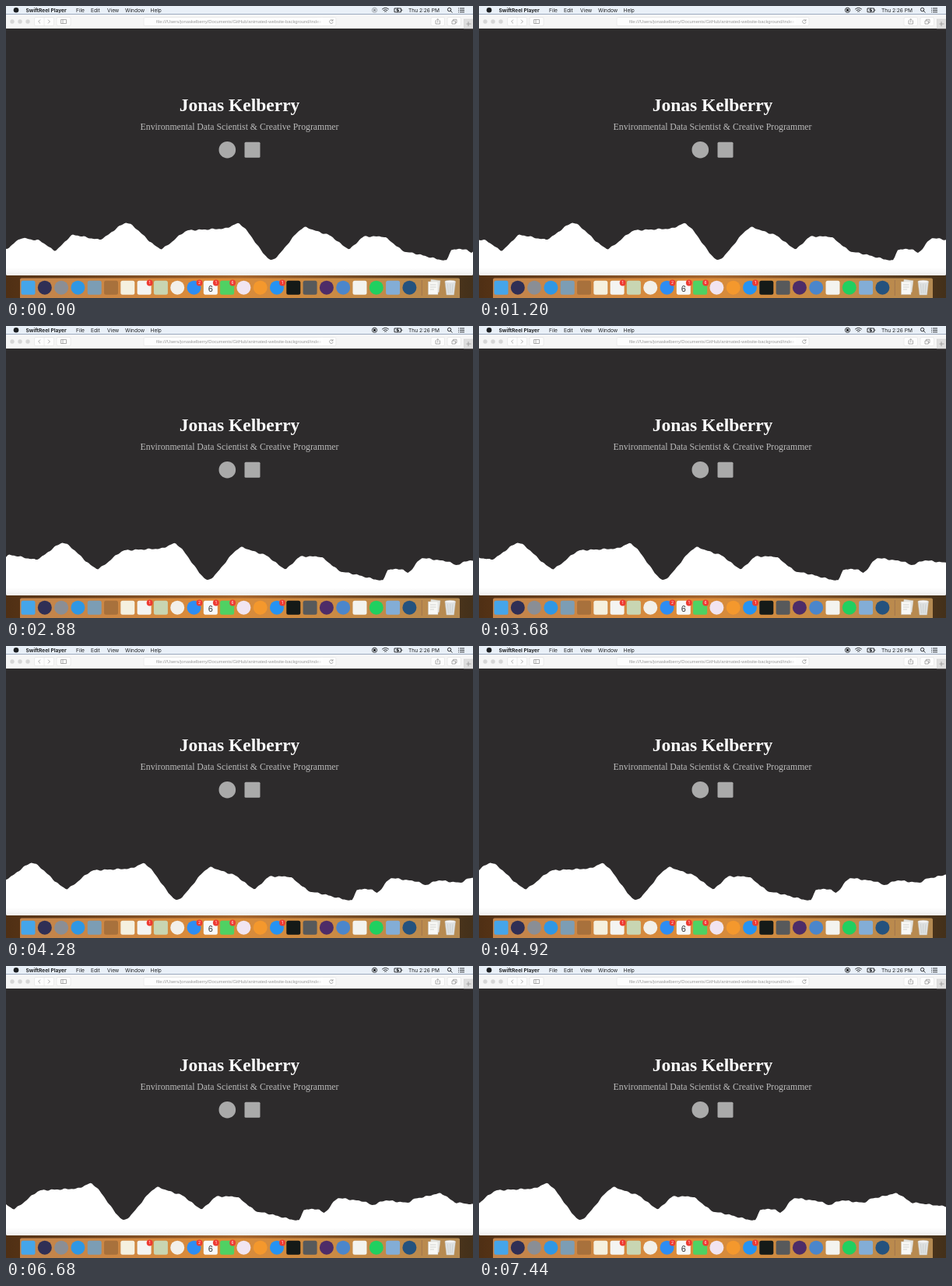
An HTML page for the animation above (7480 ms loop, 600 by 375 pixels).

```html
<!DOCTYPE html>
<html lang="en">
<head>
<meta charset="utf-8">
<title>Animated mountains</title>
<style>
  html, body { margin: 0; width: 100%; height: 100%; overflow: hidden; background: #2d2b2c; }
  svg { display: block; width: 100vw; height: 100vh; }
  .ui { font: 6.6px Inter, "Liberation Sans", sans-serif; fill: #1c1f22; }
  .serif { font-family: "Liberation Serif", serif; text-anchor: middle; }
  .button { fill: #fdfdfd; stroke: #dcdcdc; stroke-width: .5; }
  .line { fill: none; stroke: #8c8c8c; stroke-width: .7; }
  .dark { fill: none; stroke: #1c1f22; stroke-width: .9; }
</style>
</head>
<body>
<svg viewBox="0 0 600 375" preserveAspectRatio="none">
  <defs>
    <linearGradient id="wall">
      <stop offset="0" stop-color="#4f2f14"/>
      <stop offset=".5" stop-color="#a8662c"/>
      <stop offset="1" stop-color="#43301a"/>
    </linearGradient>
    <linearGradient id="shelf">
      <stop offset="0" stop-color="#c0844e"/>
      <stop offset=".45" stop-color="#dc8b38"/>
      <stop offset="1" stop-color="#b48a52"/>
    </linearGradient>
    <linearGradient id="fade">
      <stop offset="0" stop-color="#fff" stop-opacity="0"/>
      <stop offset="1" stop-color="#fff"/>
    </linearGradient>
    <linearGradient id="foot" x2="0" y2="1">
      <stop offset="0" stop-color="#eee" stop-opacity="0"/>
      <stop offset="1" stop-color="#eee"/>
    </linearGradient>
    <clipPath id="page"><path d="M0 29H600V344Q600 346 598 346H2Q0 346 0 344Z"/></clipPath>
  </defs>

  <!-- wallpaper -->
  <rect y="340" width="600" height="35" fill="url(#wall)"/>

  <!-- web page -->
  <g clip-path="url(#page)">
    <rect y="29" width="600" height="318" fill="#2d2b2c"/>
    <text class="serif" x="300" y="135" font-size="23.5" font-weight="700" fill="#fff">Jonas Kelberry</text>
    <text class="serif" x="300" y="158.6" font-size="11.75" fill="#bcbcbc">Environmental Data Scientist &amp; Creative Programmer</text>
    <circle cx="284.3" cy="184.7" r="10.8" fill="#aaa"/>
    <rect x="306.5" y="174.8" width="20" height="20" rx="1.5" fill="#aaa"/>
    <path id="ridge" fill="#fff"/>
    <rect y="336" width="600" height="10" fill="url(#foot)"/>
  </g>

  <!-- browser toolbar -->
  <rect y="11" width="600" height="18" fill="#f6f6f6"/>
  <rect y="28.5" width="600" height=".5" fill="#d2d2d2"/>
  <g fill="#d6d6d6">
    <circle cx="8" cy="20" r="2.7"/><circle cx="18" cy="20" r="2.7"/><circle cx="28" cy="20" r="2.7"/>
  </g>
  <g class="button">
    <rect x="36.5" y="14.5" width="25" height="11" rx="1.8"/>
    <rect x="65" y="14.5" width="18" height="11" rx="1.8"/>
    <rect x="177" y="14.5" width="247" height="11" rx="1.8"/>
    <rect x="546" y="14.5" width="17.5" height="11" rx="1.8"/>
    <rect x="567" y="14.5" width="17.5" height="11" rx="1.8"/>
  </g>
  <path d="M49 14.5V25.5" stroke="#dcdcdc" stroke-width=".5"/>
  <path class="line" d="M44 17.6L41.6 20L44 22.4M54 17.6L56.4 20L54 22.4M70.5 17.5H77.5V22.5H70.5ZM73 17.5V22.5"/>
  <path class="line" d="M553 18.8H552V23H557.5V18.8H556.5M554.75 21.3V16.6M553.3 18L554.75 16.5L556.2 18M573 19H577.3V23H573ZM574.5 19V17.3H579V21.5H577.3"/>
  <path class="line" d="M419.7 18.6A2.3 2.3 0 1 0 420.2 20.6M420 17V19H418"/>
  <rect x="588.5" y="17" width="12" height="12" fill="#dedede" stroke="#c6c6c6" stroke-width=".5"/>
  <path class="line" d="M591.5 23H597.5M594 20V26"/>
  <svg x="190" y="14.8" width="217" height="10.4">
    <text x="3" y="7.4" font-family="Liberation Sans, sans-serif" font-size="5.85" fill="#9b9b9b">file:///Users/jonaskelberry/Documents/GitHub/animated-website-background/index</text>
    <rect x="207" width="10" height="10.4" fill="url(#fade)"/>
  </svg>

  <!-- menu bar -->
  <rect width="600" height="11" fill="#e9f0f8"/>
  <rect y="10" width="600" height="1" fill="#9dabc0"/>
  <circle cx="13" cy="5.2" r="3.3" fill="#1c1f22"/>
  <g class="ui">
    <text x="25.5" y="7.7" font-weight="700">SwiftReel Player</text>
    <text x="90" y="7.7">File</text>
    <text x="109" y="7.7">Edit</text>
    <text x="130" y="7.7">View</text>
    <text x="153" y="7.7">Window</text>
    <text x="185.5" y="7.7">Help</text>
    <text x="517" y="7.7">Thu 2:26 PM</text>
  </g>
  <g id="record">
    <circle class="dark" cx="473.5" cy="5.3" r="3.1"/>
    <rect x="472" y="3.8" width="3" height="3" rx=".4" fill="#1c1f22"/>
  </g>
  <path class="dark" d="M483.2 4.2Q487.5 .6 491.8 4.2M484.7 5.8Q487.5 3.4 490.3 5.8M486.2 7.3Q487.5 6.2 488.8 7.3"/>
  <path class="dark" d="M499 3H507.5V7.8H499ZM508.8 4.6V6.2"/>
  <path d="M503.8 2L501 5.8H503L502.5 8.8L505.5 4.9H503.4Z" fill="#1c1f22"/>
  <path class="dark" d="M571.8 4.6A2.2 2.2 0 1 1 567.4 4.6A2.2 2.2 0 1 1 571.8 4.6M571.2 6.2L573.5 8.5M581 3H582M583 3H589M581 5.4H582M583 5.4H589M581 7.8H582M583 7.8H589"/>

  <!-- dock -->
  <path d="M18 375V351.5Q18 349.5 20 349.5H581Q583 349.5 583 351.5V375Z" fill="url(#shelf)"/>
  <g id="dock"></g>
  <path d="M534.3 352V372" stroke="#8d6b50" stroke-width=".6"/>
  <g stroke="#c8c8c8" stroke-width=".4">
    <rect x="545" y="352" width="12" height="15" fill="#e9e9e4" transform="rotate(7 551 360)"/>
    <rect x="542.5" y="354" width="12.5" height="16.5" fill="#f8f8f5"/>
    <path d="M545 358H552.5M545 361H552.5M545 364H550" stroke="#999"/>
    <path d="M564 354H577.5L575.5 371H566Z" fill="#dfe2e2"/>
    <ellipse cx="570.7" cy="354" rx="6.9" ry="1.7" fill="#f4f5f5"/>
    <path d="M567.5 357L568.5 369M570.7 357V369M574 357L573 369" stroke="#b3b8b8"/>
  </g>
</svg>
<script>
const LOOP = 7480, STEP = 40, SPEED = 0.02836;

// Peaks, saddles and valleys; everything between them is eased.
const summits = [
  [0, 312], [20, 298], [42, 301], [63, 314], [86, 294], [120, 300], [155, 278], [199, 312],
  [234, 288], [280, 286], [299, 279], [341, 327], [383, 284], [412, 293], [441, 312], [460, 296],
  [484, 296], [514, 316], [566, 327], [572, 313], [589, 312], [598, 317], [616, 298], [648, 302],
  [660, 307], [677, 301], [704, 304], [718, 298], [748, 292], [768, 304], [815, 309]
];

const ease = u => (u + u * u * (3 - 2 * u)) / 2;
const ripple = x => 0.5 * Math.sin(x * 0.42) + 0.4 * Math.sin(x * 0.73);

function heightAt(x) {
  const i = Math.max(1, summits.findIndex(([sx]) => sx >= x));
  const [x0, y0] = summits[i - 1], [x1, y1] = summits[i];
  return y0 + (y1 - y0) * ease((x - x0) / (x1 - x0)) + ripple(x);
}

function ridgePath(width) {
  let d = "M0 350";
  for (let x = 0; x <= width; x += 2) d += `L${x} ${heightAt(x).toFixed(2)}`;
  return d + "V350Z";
}

// Dock apps from left to right.
const square = (color, badge) => ({ color, badge, round: 2.5 });
const circle = (color, badge) => ({ color, badge, round: 9 });
const apps = [
  square("#45a5ea"), circle("#302f55"), circle("#8a8e95"), circle("#2f97e4"),
  square("#7c9db4"), square("#a8713c"), square("#f5f0df"), square("#f4f4f2", 1),
  square("#c8d5b2"), circle("#f2efe9"), circle("#2d8df3", 2), square("#f8f8f8", 1),
  square("#4fd163", 6), circle("#f1e4f0"), circle("#f4982d"), circle("#2593f2", 1),
  square("#151a18"), square("#57595b"), circle("#4d2c68"), circle("#4b86cb"),
  square("#f3f3ef"), circle("#20d060"), square("#83add6"), circle("#24527e")
];
const CALENDAR = 11;

const label = (x, y, size, fill, text) =>
  `<text x="${x}" y="${y}" font-family="Inter, sans-serif" font-size="${size}" fill="${fill}" text-anchor="middle">${text}</text>`;

function appIcon({ color, badge, round }, i) {
  const x = 28.5 + i * 21.3;
  let icon = `<rect x="${x - 9}" y="352.7" width="18" height="18" rx="${round}" fill="${color}"/>`;
  if (i === CALENDAR) icon += label(x, 366.5, 10, "#333", "6");
  if (badge) {
    icon += `<circle cx="${x + 7}" cy="355.5" r="3.9" fill="#ee3a32"/>` + label(x + 7, 357.3, 5, "#fff", badge);
  }
  return icon;
}

const ridge = document.getElementById("ridge");
const record = document.getElementById("record");
ridge.setAttribute("d", ridgePath(814));
document.getElementById("dock").innerHTML = apps.map(appIcon).join("");

function draw(now) {
  const t = Math.floor((now % LOOP) / STEP) * STEP;
  ridge.setAttribute("transform", `translate(${-t * SPEED} 0)`);
  record.setAttribute("opacity", t < 200 ? 0.4 : 1);
}

const start = performance.now();
function tick() {
  draw(performance.now() - start);
  requestAnimationFrame(tick);
}
tick();
</script>
</body>
</html>
```
